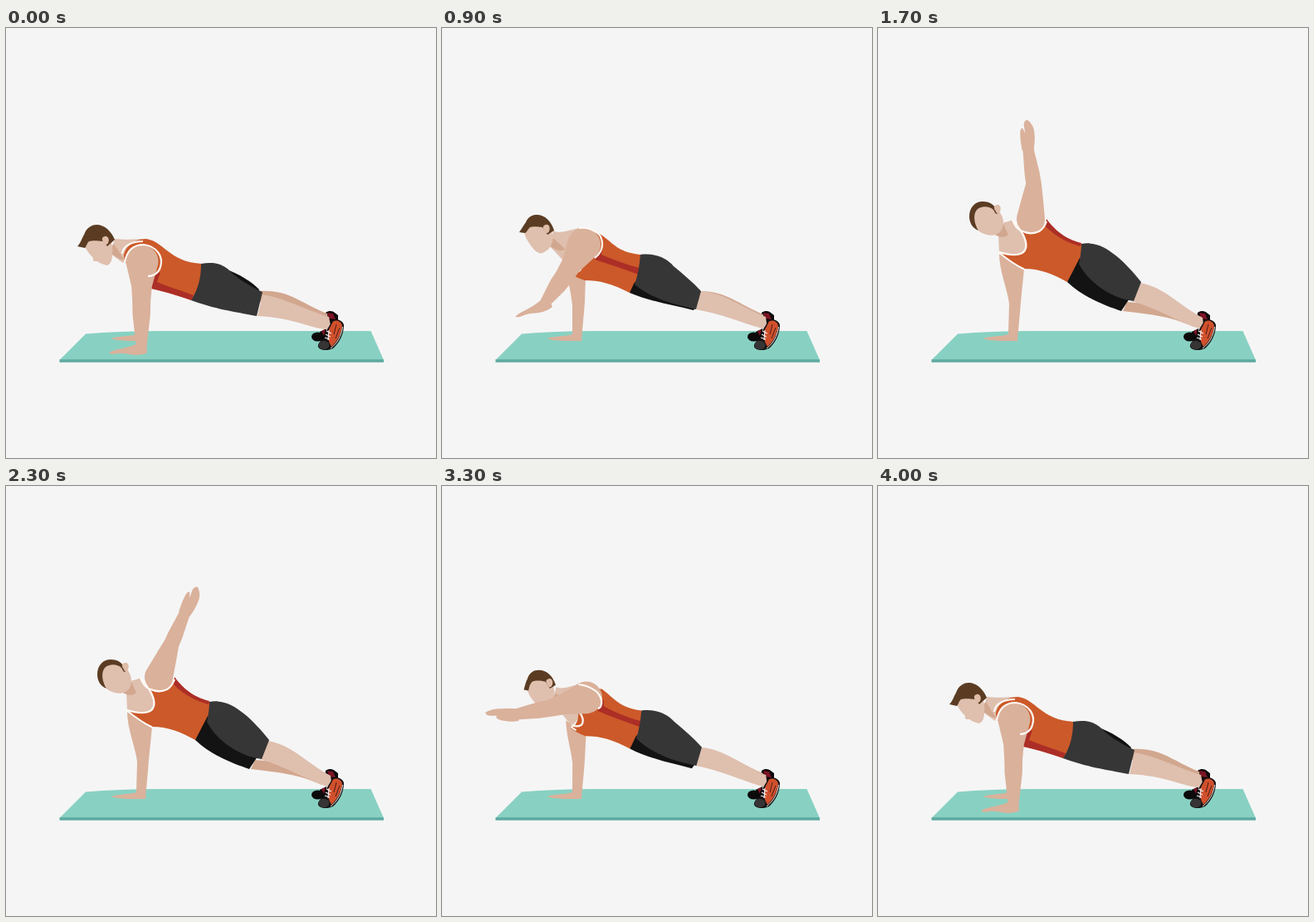
Write an HTML page that moves like this. It is 518 by 518 pixels and loops after 4.4 s.

```html
<!DOCTYPE html>
<html lang="en">
<head>
<meta charset="utf-8">
<title>Plank rotation</title>
<style>
html, body { margin: 0; width: 100%; height: 100%; overflow: hidden; background: #f5f5f5; }
svg { display: block; width: 100vw; height: 100vh; }
</style>
</head>
<body>
<svg id="stage" viewBox="0 0 518 518">
  <path fill="#88d1c2" d="M96 368.500Q135 365 185 365H439.500L455 400H64.500Z"/>
  <path fill="#5eaaa0" d="M64.500 399.300H455V402.700H64.500Z"/>
  <g id="farShoe">
    <path fill="#0c0a0b" d="M385 343C389 340 394 341 396 343L400 346L400 357L392 362L384 352Z"/>
    <path fill="#7c1424" d="M387 343L394 344L397 351L389 350Z"/>
    <path fill="#0c0a0b" d="M378 366L386 362L388 374L378 377Z"/>
    <ellipse cx="375.500" cy="372" rx="7.500" ry="5.500" fill="#0c0a0b"/>
    <path fill="#7c1424" d="M380 365L385 363L383 371Z"/>
  </g>
  <g id="body"></g>
  <g id="nearShoe">
    <path fill="#141112" d="M393 353C399 349 406 353 407 358C407 368 402 379 394 386C388 389 378 389 376 384C375 379 382 375 385 372L387 363Z"/>
    <path fill="#d0502c" d="M394 353.500C399 351 404 354 405 358.500C404 368 399 378 392 384L389 378L388 371L389 363Z"/>
    <path fill="none" stroke="#f1e9e6" stroke-width="1" d="M405.500 360C404 371 399 380 391 386"/>
    <path fill="none" stroke="#4a1e17" stroke-width="1" d="M398 357L395 369M402 361L397 374"/>
    <ellipse cx="383" cy="382" rx="6.500" ry="5.300" fill="#363435"/>
    <path fill="none" stroke="#f4eeee" stroke-width="1.200" d="M386 365L392 368M385 369L391 372M384 373L390 375M389 364L388 376"/>
  </g>
  <g id="front"></g>
</svg>
<script>
const LOOP = 4400, STEP = 100;
const SKIN = '#dab19b', PALE = '#dfbfae', SHADE = '#d2a78f';

// Each part has one outline per body pose: plank, landing, lifting, open.
const palm = ' L157 369C146 372 134 371 127 374C133 377 140 376 146 377L168 377C169 362 171 345 172 330L';
const earShape = 'c4 -1 6 4 4 8c-2 3 -4 3 -5 0c-3 -4 -3 -7 1 -8Z';

const bodyParts = [
  // far leg
  { fill: SHADE, d: [
    'M304 317C340 314 352 330 387 344L388 352C360 345 340 335 306 330Z',
    'M310 316C340 315 355 330 387 344L388 352C360 345 340 335 308 325Z',
    'M312 317C342 317 358 333 387 345L388 354C360 345 340 335 308 327Z',
    'M300 330C325 331 355 338 385 350L380 360C355 348 330 345 295 341Z'] },
  // near leg
  { fill: PALE, d: [
    'M309 321C335 325 362 340 389 348L392 363C372 365 350 349 303 347Z',
    'M311 316C335 319 362 338 390 348L392 363C372 362 350 350 304 342Z',
    'M312 317C338 318 364 338 390 348L392 363C372 360 345 346 306 339Z',
    'M316 307C345 312 362 334 391 349L393 363C372 360 345 341 306 329Z'] },
  // supporting arm
  { fill: SKIN, d: [
    'M150 290C151 310 156 320 157 335' + palm + '172 300Z',
    'M158 292C157 310 158 320 158 335' + palm + '174 300Z',
    'M150 285C151 305 156 320 157 335' + palm + '173 300Z',
    'M146 272C146 292 156 315 158 332' + palm + '176 290Z'] },
  // neck and chest
  { fill: PALE, d: [
    'M131 254C140 255 152 255 163 254C158 262 148 270 141 283L126 272Z',
    'M135 244C142 247 150 245 162 243C155 250 146 258 145 270L131 259Z',
    'M134 244C140 248 148 245 165 241C172 262 160 285 158 293L130 263Z',
    'M152 234C155 234 158 233 162 231C186 258 186 282 146 270L145 248Z'] },
  { fill: SHADE, d: [
    'M126 264L130 260L142 279C138 280 132 275 127 272Z',
    'M131 258L134 252L146 266C142 269 136 263 131 259Z',
    'M130 261L134 253L148 266C144 271 137 267 130 263Z',
    'M138 248L151 236L157 249C150 255 144 250 138 248Z'] },
  // vest
  { fill: '#cc5929', d: [
    'M142 274C144 262 156 254 168 254C190 256 196 282 236 284C242 300 238 315 224 328C206 322 190 316 170 313C171 308 172 302 173 296C160 292 142 290 142 274Z',
    'M145 268C145 252 155 243 166 243C188 245 200 273 238 276C244 294 241 308 230 322C205 314 190 308 165 301C165 298 166 293 168 288C155 285 146 280 145 268Z',
    'M164 272C168 246 180 243 190 248C206 258 210 270 239 273C243 290 240 305 226 319C205 308 190 304 172 304C166 302 161 300 157 297C159 290 160 282 164 272Z',
    'M162 231C170 249 196 249 203 231C215 247 228 257 245 260C252 279 244 297 228 306C210 296 195 290 176 290C166 286 156 278 146 270C186 282 186 258 162 231Z'] },
  { fill: '#ac2e26', d: [
    'M186 294L182 306C196 312 210 316 226 322L223 328C206 322 190 317 170 313L172 299Z',
    'M190 272L189 282C204 288 220 293 236 298L234 306C215 300 198 294 179 290L184 280Z',
    'M193 264L192 273C206 279 222 285 238 289L237 297C218 290 200 284 184 279L187 274Z',
    'M203 230L206 234C216 246 228 255 245 259L244 263C228 259 212 250 202 239L203 233Z'] },
  // shorts, far leg above and below
  { fill: '#121212', d: [
    'M264 290C282 297 295 305 305 315L303 319C290 312 280 305 268 298Z',
    'M270 292C282 299 292 305 304 314L303 319C290 312 280 307 270 298Z',
    'M270 292C282 299 292 305 304 314L303 319C290 312 280 307 270 298Z',
    'M270 280C282 287 292 297 304 308L303 313C290 306 280 299 270 290Z'] },
  { fill: '#131313', d: [
    'M232 310C250 325 275 335 300 343L300 343C278 338 250 334 226 326Z',
    'M234 312C250 325 270 330 304 340L303 341C280 337 250 331 229 322Z',
    'M232 306C255 324 280 330 306 336L303 340C278 334 250 329 226 319Z',
    'M243 277C258 309 280 319 303 326L293 341C275 335 248 325 228 306Z'] },
  // shorts, near leg
  { fill: '#363636', d: [
    'M235 284C250 281 262 284 271 294C282 304 296 312 309 318L302 347C285 343 255 340 223 328C232 314 235 300 235 284Z',
    'M238 276C255 274 268 281 276 290C288 300 300 308 311 315L304 342C285 337 255 330 230 321C236 308 238 292 238 276Z',
    'M239 273C255 271 270 276 279 287C291 297 302 306 312 317L306 339C285 334 255 328 232 309C236 298 238 285 239 273Z',
    'M245 260C262 257 275 265 285 273C298 283 308 295 317 306L308 329C290 327 258 314 242 284C244 275 245 266 245 260Z'] },
  // collar and lower armhole
  { line: 2.2, d: [
    'M140 272C141 262 152 257 165 257',
    'M146 266C146 257 150 250 158 247',
    'M159 293C168 295 170 288 165 281',
    'M146 270C186 282 186 258 162 231'] },
  { line: 2, d: [
    'M165 290C165 290 165 290 165 290',
    'M165 290C165 290 165 290 165 290',
    'M158 295C158 295 158 295 158 295',
    'M145 270C155 278 166 286 176 290.5'] },
  // head
  { fill: PALE, d: [
    'M94 262C97 268 101 273 105 277C104 282 108 281 110 281C114 284 118 285 122 286C127 284 128 278 128 272C132 250 108 236 94 262Z',
    'M98 247C102 254 106 259 110 263C109 268 113 267 115 268C119 271 123 272 126 273C131 271 133 265 133 259C137 238 112 224 98 247Z',
    'M99 246C100 251 103 257 107 262C109 265 111 267 113 269C116 271 119 272 121 271C126 269 131 265 133 258C137 236 112 222 99 246Z',
    'M114 232C115 236 117 241 121 244C124 247 128 248 131 249C138 251 146 249 149 243C153 236 151 226 145 220C136 208 112 210 114 232Z'] },
  { fill: '#5b3c23', d: [
    'M86 263C90 259 91 254 94 249C97 240 104 237 109 237C119 237 127 245 131 255L122 263L117 257C110 256 103 256 100 257C97 260 97 263 95 265Z',
    'M91 248C95 244 96 239 99 235C102 228 108 226 113 226C123 226 131 234 135 245L126 251L122 243C115 242 108 242 104 243C101 246 101 248 99 249Z',
    'M93 246C96 242 98 238 101 234C104 227 109 225 114 225C124 225 132 233 135 244L127 249L121 240C115 239 109 239 106 240C103 243 102 246 100 247Z',
    'M121 244C114 241 110 235 110 227C110 216 117 209 126 209C135 209 141 213 145 223L142 224L139 219C134 214 124 214 119 219C114 225 116 236 121 244Z'] },
  { fill: '#dfbca8', d: ['M119 251', 'M124 239', 'M125 237', 'M143 213'].map(m => m + earShape) }
];

const frontParts = [
  { line: 2.2, d: [
    'M143 283C146 263 158 261 166 261C182 263 190 276 186 288C184 295 178 299 171 299',
    'M146 275C144 256 152 245 164 245C180 245 191 256 190 267C188 278 180 284 170 285',
    'M165 241C172 240 180 242 186 246C193 250 195 262 191 269C189 273 187 275 184 277',
    'M162 231C164 237 167 242 172 244C180 248 188 248 194 245C199 242 201 238 203 233'] }
];

const shoulder = [[164, 281, 19.5], [167, 266, 20], [171, 261, 20], [184, 230, 17]];
const hand = [
  'M-6 6C2 6 8 3 16 2C24 1 32 1 39 -1C40 -3 36 -4 32 -4L28 -4L22 -5C18 -6 14 -8 8 -9C2 -10 -4 -9 -6 -8Z',
  'M-4 7C4 8 10 9 18 8C24 8 30 4 33 0C33 -4 28 -5 24 -4L17 -3L23 -6C24 -9 18 -9 14 -9C8 -9 2 -8 -4 -7Z'];

// time, pose
const poseKeys = [[0, 0], [400, 0], [900, 2], [1000, 2.05], [1600, 2.8], [1700, 3],
  [2900, 3], [3400, 2], [3600, 1], [4000, 0], [LOOP, 0]];

// time, upper angle, upper length, fore angle, fore length, hand angle, hand open
const armKeys = [
  [0, 91, 47, 90, 56, 172, 0],
  [400, 91, 47, 90, 56, 172, 0],
  [900, 122, 46, 126, 38, 157, 0],
  [1000, 126, 46, 138, 40, 166, .2],
  [1200, 139, 45, 163, 43, 190, .5],
  [1400, 195, 43, 200, 44, 212, .9],
  [1600, 268, 41, 235, 47, 237, 1],
  [1700, 275, 42, 261, 45, 269, 1],
  [2100, 293, 42, 300, 43, 303, 1],
  [2300, 291, 42, 293.5, 43, 297, 1],
  [2600, 278, 42, 264, 45, 270, 1],
  [2800, 273, 40, 231, 48, 234, 1],
  [2900, 269, 37, 216, 49, 220, 1],
  [3200, 195, 44, 190, 44, 200, .8],
  [3400, 132, 47, 150, 41, 170, .3],
  [3600, 108, 51, 118, 37, 153, 0],
  [4000, 91, 47, 90, 56, 172, 0],
  [LOOP, 91, 47, 90, 56, 172, 0]
];

const mix = (a, b, k) => a + (b - a) * k;
const mixList = (a, b, k) => a.map((v, i) => mix(v, b[i], k));

function mixPath(a, b, k) {
  const nums = b.match(/-?[\d.]+/g);
  let i = 0;
  return a.replace(/-?[\d.]+/g, v => mix(+v, +nums[i++], k).toFixed(2));
}

function atTime(keys, t) {
  let i = 1;
  while (i < keys.length - 1 && t > keys[i][0]) i++;
  const a = keys[i - 1], b = keys[i];
  return mixList(a, b, (t - a[0]) / (b[0] - a[0])).slice(1);
}

const polar = ([x, y], angle, r) => [x + r * Math.cos(angle), y + r * Math.sin(angle)];
const rad = deg => deg * Math.PI / 180;

// Outline around two circles of different radius
function taper([p, r], [q, s]) {
  const dir = Math.atan2(q[1] - p[1], q[0] - p[0]);
  const spread = Math.acos((r - s) / Math.hypot(q[0] - p[0], q[1] - p[1]));
  return `M${polar(p, dir + spread, r)}A${r} ${r} 0 1 1 ${polar(p, dir - spread, r)}` +
    `L${polar(q, dir - spread, s)}A${s} ${s} 0 0 1 ${polar(q, dir + spread, s)}Z`;
}

const limb = joints => joints.slice(1).map((j, i) => taper(joints[i], j)).join('');

function addPath(parent, attrs) {
  const el = document.createElementNS('http://www.w3.org/2000/svg', 'path');
  for (const name in attrs) el.setAttribute(name, attrs[name]);
  return parent.appendChild(el);
}

function addPart(parent, part) {
  part.el = addPath(parent, part.line
    ? { fill: 'none', stroke: '#fffaf5', 'stroke-width': part.line }
    : { fill: part.fill });
}

const body = document.getElementById('body');
const front = document.getElementById('front');
bodyParts.forEach(p => addPart(body, p));
const armEl = addPath(front, { fill: SKIN });
const handEl = addPath(front, { fill: SKIN });
frontParts.forEach(p => addPart(front, p));
const parts = bodyParts.concat(frontParts);

function drawArm(t, i, k) {
  const [x, y, r] = mixList(shoulder[i], shoulder[i + 1], k);
  const [upper, upperLen, fore, foreLen, turn, open] = atTime(armKeys, t);
  const top = [x, y];
  const elbow = polar(top, rad(upper), upperLen);
  const wrist = polar(elbow, rad(fore), foreLen);
  const elbowR = 11 - 1.7 * open;
  armEl.setAttribute('d', limb([
    [top, r],
    [mixList(top, elbow, .6), 12.5],
    [elbow, elbowR],
    [mixList(elbow, wrist, .3), elbowR * .97],
    [wrist, 6.3]
  ]));
  handEl.setAttribute('d', mixPath(hand[0], hand[1], open));
  handEl.setAttribute('transform', `translate(${wrist}) rotate(${turn})`);
}

function draw(ms) {
  const t = Math.floor(ms % LOOP / STEP) * STEP;
  const pose = atTime(poseKeys, t)[0];
  const i = Math.min(2, Math.floor(pose)), k = pose - i;
  for (const p of parts) p.el.setAttribute('d', mixPath(p.d[i], p.d[i + 1], k));
  drawArm(t, i, k);
}

let start;
function tick(now) {
  if (start === undefined) start = now;
  draw(now - start);
  requestAnimationFrame(tick);
}
draw(0);
requestAnimationFrame(tick);
</script>
</body>
</html>
```
